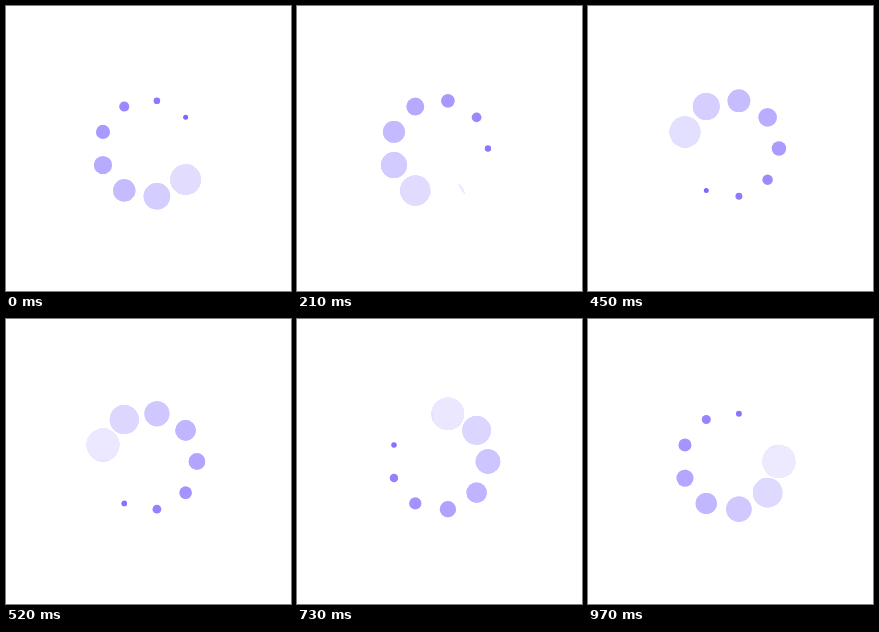
These frames come from a looping animation (285 by 285 pixels, 1 s). An HTML page with a canvas:

```html
<!DOCTYPE html>
<html lang="en">
<head>
<meta charset="utf-8">
<title>Loading spinner</title>
<style>
  html, body { margin: 0; width: 100%; height: 100%; overflow: hidden; background: #fff; }
  canvas { display: block; width: 285px; height: 285px; }
</style>
</head>
<body>
<canvas id="stage" width="285" height="285"></canvas>
<script>
const SIZE = 285, DOTS = 9, STEPS = 33, LOOP = 1000;
const ORBIT = SIZE * 0.17;
const MIN_ALPHA = 32; // anything fainter counts as white
const ctx = document.getElementById('stage').getContext('2d', { willReadFrequently: true });

// 30 ms steps, with one longer step just past the middle of the loop
const stepAt = t => t < 540 ? Math.min(17, Math.floor(t / 30)) : Math.min(STEPS - 1, Math.floor((t - 10) / 30));

const radius = p => Math.min(18.7, Math.hypot(2.5, 19.9 * p));

function drawDot(i, step) {
  const p = (11 * (DOTS - 1 - i) + 3 * step) % 99 / 99;
  const angle = i * 2 * Math.PI / DOTS;
  ctx.fillStyle = `rgba(125, 104, 255, ${1 - p})`;
  ctx.beginPath();
  ctx.arc(SIZE / 2 + ORBIT * Math.cos(angle), SIZE / 2 + ORBIT * Math.sin(angle), radius(p), 0, 2 * Math.PI);
  ctx.fill();
}

function dropFaint() {
  const img = ctx.getImageData(0, 0, SIZE, SIZE);
  const px = img.data;
  for (let i = 3; i < px.length; i += 4) {
    if (px[i] < MIN_ALPHA) px[i] = 0;
  }
  ctx.putImageData(img, 0, 0);
}

let shown = -1;
function render(now) {
  const step = stepAt(now % LOOP);
  if (step !== shown) {
    shown = step;
    ctx.clearRect(0, 0, SIZE, SIZE);
    for (let i = 0; i < DOTS; i++) drawDot(i, step);
    dropFaint();
  }
}

let start;
function tick(now) {
  start ??= now;
  render(Math.max(0, now - start));
  requestAnimationFrame(tick);
}
render(0);
requestAnimationFrame(tick);
</script>
</body>
</html>
```
